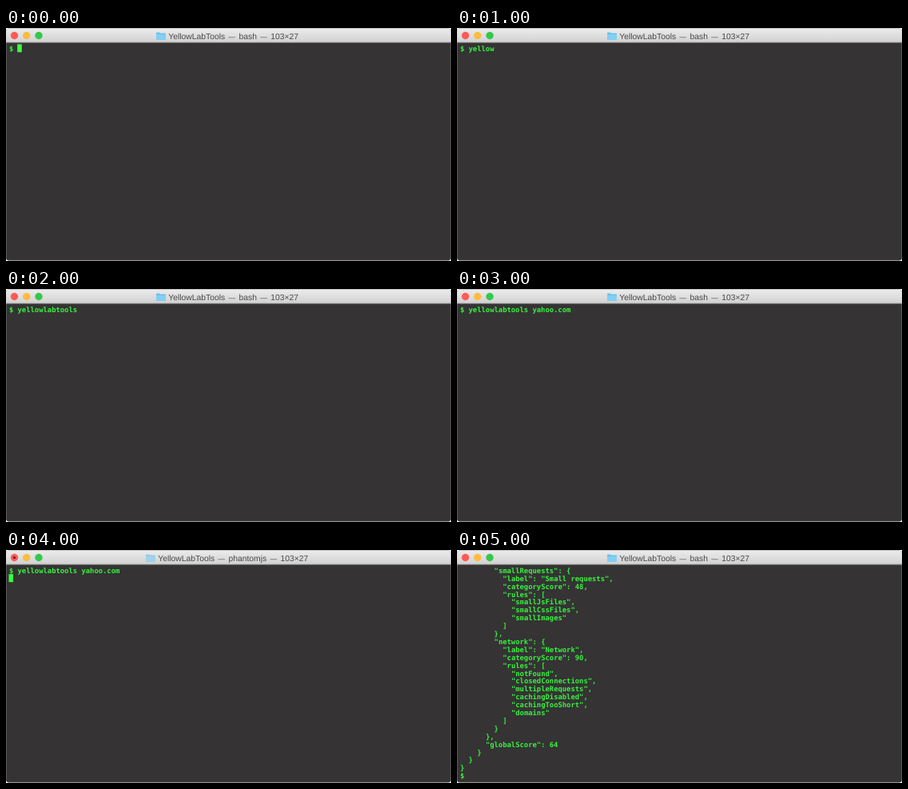
An HTML page that plays this animation: 557x292 px, repeating every 6000 ms.

```html
<!DOCTYPE html>
<html lang="en">
<head>
<meta charset="utf-8">
<title>Terminal</title>
<style>
  html, body { margin: 0; width: 100%; height: 100%; overflow: hidden; background: #fff; }
  svg { display: block; width: 557px; height: 292px; }
  text { text-rendering: geometricPrecision; white-space: pre; }
  #title { font: 10.35px "Liberation Sans", Arial, sans-serif; word-spacing: 1.5px; fill: #484848; }
  #title .dash { font-size: 8.6px; }
  #screen { font: bold 8.86px "DejaVu Sans Mono", Menlo, monospace; fill: #35f53d; }
</style>
</head>
<body>
<svg viewBox="0 0 557 292">
  <defs>
    <linearGradient id="bar" x2="0" y2="1">
      <stop offset="0" stop-color="#ececec"/>
      <stop offset="1" stop-color="#d1d1d1"/>
    </linearGradient>
    <clipPath id="frame"><rect y="0.5" width="557" height="291" rx="4"/></clipPath>
  </defs>
  <g clip-path="url(#frame)">
    <rect width="557" height="292" fill="#353334"/>
    <rect width="557" height="18" fill="url(#bar)"/>
    <rect y="17.5" width="557" height="1" fill="#a9a9a9"/>
    <path d="M.25 18V291.25H556.75V18" fill="none" stroke="#8a8a8a" stroke-width=".6"/>
  </g>
  <circle cx="10.5" cy="9.5" r="4.7" fill="#fc5b57"/>
  <circle id="dot" cx="10.5" cy="9.5" r="1.5" fill="#6b0d0b"/>
  <circle cx="25.7" cy="9.5" r="4.7" fill="#fdbc40"/>
  <circle cx="41" cy="9.5" r="4.7" fill="#34c84a"/>
  <g id="folder">
    <path d="M0 1.2Q0 .4 .8 .4H4L5.2 1.6H11.2Q12 1.6 12 2.4V9Q12 9.7 11.2 9.7H.8Q0 9.7 0 9Z" fill="#6cc0ea"/>
    <path d="M0 3H12V9Q12 9.7 11.2 9.7H.8Q0 9.7 0 9Z" fill="#82cff3"/>
  </g>
  <text id="title" y="13.6">YellowLabTools <tspan class="dash">—</tspan> <tspan id="process"></tspan> <tspan class="dash">—</tspan> 103×27</text>
  <g id="screen"></g>
  <rect id="cursor" width="5.6" height="10" fill="#3bfd3f"/>
</svg>
<script>
const $ = id => document.getElementById(id);
const LOOP = 6000, LEFT = 3.9, COL = 5.334, TOP = 28.8, ROW = 9.9;

const report = `        "smallRequests": {
          "label": "Small requests",
          "categoryScore": 48,
          "rules": [
            "smallJsFiles",
            "smallCssFiles",
            "smallImages"
          ]
        },
        "network": {
          "label": "Network",
          "categoryScore": 90,
          "rules": [
            "notFound",
            "closedConnections",
            "multipleRequests",
            "cachingDisabled",
            "cachingTooShort",
            "domains"
          ]
        }
      },
      "globalScore": 64
    }
  }
}
$`;

const command = "$ yellowlabtools yahoo.com";
const scenes = [
  { text: "$", cursor: [2, 0] },
  { text: command.slice(0, 8) },
  { text: command.slice(0, 16) },
  { text: command },
  { text: command, cursor: [0, 1], busy: true },
  { text: report }
];

function printLine(line, row) {
  const el = document.createElementNS("http://www.w3.org/2000/svg", "text");
  const indent = line.search(/\S/);
  el.setAttribute("x", LEFT + indent * COL);
  el.setAttribute("y", TOP + row * ROW);
  el.textContent = line.trim();
  return el;
}

function show({ text, cursor, busy }) {
  $("screen").replaceChildren(...text.split("\n").map(printLine));

  const left = busy ? 175 : 188;
  $("process").textContent = busy ? "phantomjs" : "bash";
  $("title").setAttribute("x", left + 15.2);
  $("folder").setAttribute("transform", `translate(${left} 5)`);
  $("folder").setAttribute("opacity", busy ? 0.65 : 1);
  $("dot").setAttribute("visibility", busy ? "visible" : "hidden");

  $("cursor").setAttribute("visibility", cursor ? "visible" : "hidden");
  if (cursor) {
    $("cursor").setAttribute("x", 3.5 + cursor[0] * COL);
    $("cursor").setAttribute("y", 20.3 + cursor[1] * ROW);
  }
}

const start = performance.now();
let current = -1;

function tick() {
  const time = (performance.now() - start) % LOOP;
  const index = Math.floor(time / (LOOP / scenes.length));
  if (index !== current) show(scenes[current = index]);
  requestAnimationFrame(tick);
}
tick();
</script>
</body>
</html>
```
